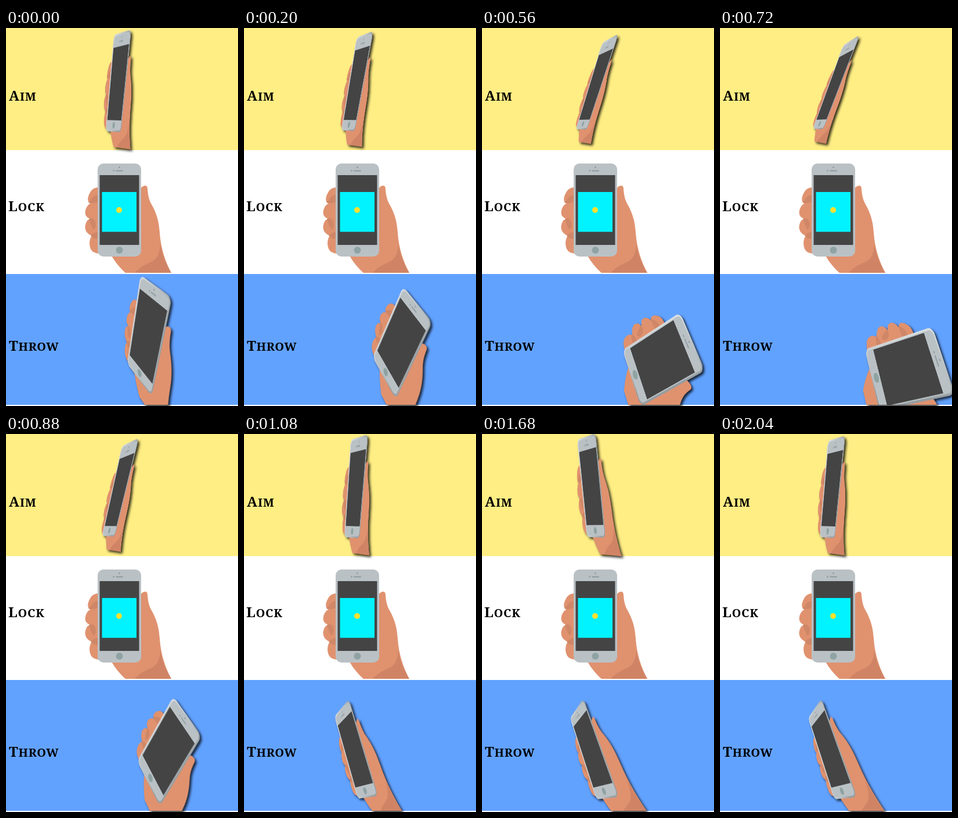
Animation, 400 px wide and 650 px high, one loop 2.48 s. Source, as an HTML page:

```html
<!DOCTYPE html>
<html lang="en">
<head>
<meta charset="utf-8">
<title>Aim, Lock, Throw</title>
<style>
  html, body { margin: 0; width: 100%; height: 100%; overflow: hidden; background: #fff; }
  .stage { position: absolute; left: 0; top: 0; width: 400px; height: 650px; overflow: hidden; }
  .band { position: absolute; left: 0; width: 100%; }
  .aim { top: 0; height: 210px; background: #ffee84; }
  .throw { top: 423px; height: 225px; background: #62a2ff; }
  .layer { position: absolute; inset: 0; }
  .shade { filter: drop-shadow(3px 3px 2px rgba(0, 0, 0, .8)); }
  .cut { clip-path: inset(-50px 0 2px 0); }
  svg { position: absolute; left: 0; top: 0; overflow: visible; }
  .device { width: 170px; height: 205px; transform-origin: 0 0; }
  text { font: 700 20px "Noto Serif", serif; letter-spacing: .8px; fill: #000; }
  .cap { font-size: 24px; }
</style>
</head>
<body>
<div class="stage">
  <div class="band aim"></div>
  <div class="band throw"></div>

  <svg width="400" height="650" viewBox="0 0 400 650">
    <defs>
      <linearGradient id="rim" x1="0" x2="1" y1="0" y2=".3">
        <stop offset="0" stop-color="#dce1e3"/>
        <stop offset=".6" stop-color="#bac1c5"/>
        <stop offset="1" stop-color="#959da1"/>
      </linearGradient>
      <g id="hand">
        <path fill="#e0926f" d="M228 284 C231 276 234 272 240 271 Q244 271 244 277 C245 290 247 297 253 307 C262 324 264 338 265 352 C267 380 275 402 285 421 L206 421 C197 413 189 404 181 390 L190 330 Z"/>
        <path fill="#d08465" d="M222 421 C230 411 242 406 251 402 C261 397 265 388 266 372 C269 391 276 406 285 421 Z"/>
        <g fill="#e0926f">
          <path d="M163 274 Q151 273 146 281 Q139 292 142 299 Q147 306 163 304 Z"/>
          <path d="M163 298 Q148 299 142 304 Q135 312 137 321 Q140 330 163 331 Z"/>
          <path d="M163 324 Q146 326 140 331 Q134 341 138 349 Q143 359 163 360 Z"/>
          <path d="M163 352 Q151 355 146 360 Q142 370 146 380 Q150 388 163 388 Z"/>
        </g>
        <g fill="#cf8767">
          <path d="M158 287 Q151 288 148 293 Q144 299 142 300 Q149 303 158 299 Z"/>
          <path d="M143 328 Q151 325 154 333 Q157 342 151 347 Q146 340 143 328 Z"/>
          <path d="M146 357 Q153 350 158 351 L158 362 Q151 364 146 357 Z"/>
        </g>
      </g>
      <g id="phone">
        <rect x="158" y="233" width="75" height="160" rx="10" fill="#bac1c5"/>
        <rect x="161.5" y="253" width="68" height="120" fill="#444"/>
        <g fill="#929ea2">
          <circle cx="195.5" cy="239.5" r="1.4"/>
          <circle cx="185.5" cy="245.5" r="1.4"/>
          <rect x="189" y="244.5" width="13" height="2.2" rx="1.1"/>
        </g>
        <circle cx="195.5" cy="382" r="6" fill="#8fa3a3"/>
      </g>
    </defs>

    <use href="#hand"/>
    <use href="#phone"/>
    <rect x="165.5" y="282" width="59.5" height="68.5" fill="#00f3ff"/>
    <circle cx="195" cy="313" r="5" fill="#ffe12f"/>

    <text x="5" y="125"><tspan class="cap">A</tspan>IM</text>
    <text x="4" y="315"><tspan class="cap">L</tspan>OCK</text>
    <text x="5" y="555"><tspan class="cap">T</tspan>HROW</text>
  </svg>

  <div class="layer shade">
    <div class="layer">
      <svg class="device" id="aimer" viewBox="130 225 170 205">
        <use href="#hand"/><use href="#phone"/>
        <rect x="159" y="234" width="73" height="158" rx="9" fill="none" stroke="url(#rim)" stroke-width="2.5"/>
      </svg>
    </div>
  </div>
  <div class="layer shade">
    <div class="layer cut">
      <svg class="device" id="thrower" viewBox="130 225 170 205">
        <use href="#hand"/><use href="#phone"/>
        <rect x="159" y="234" width="73" height="158" rx="9" fill="none" stroke="url(#rim)" stroke-width="2.5"/>
      </svg>
    </div>
  </div>
</div>

<script>
const LOOP = 2480, STEP = 40, REST = 2040;

// Phone corners: top left, top right, bottom right, bottom left
const upright = [186, 12, 216, 3, 198, 179, 172, 177];
const aimKeys = [
  [0, upright],
  [400, [202, 21, 230, 8, 184, 175, 164, 174]],
  [720, [212, 30, 241, 12, 178, 174, 160, 173]],
  [1080, [184, 10, 214, 1, 199, 179, 173, 177]],
  [1400, [152, 15, 186, 1, 220, 176, 186, 175]],
  [1680, [164, 10, 196, -1, 213, 178, 181, 177]],
  [REST, upright]
];

const raised = [232, 425, 286, 464, 251, 633, 209, 577];
const tilted = [317, 465, 363, 548, 272, 643, 235, 555];
const released = [152, 489, 175, 455, 236, 624, 197, 628];
const throwKeys = [
  [0, raised],
  [400, tilted],
  [720, [366, 514, 405, 630, 275, 658, 250, 553]],
  [840, tilted],
  [960, raised],
  [1080, [156, 486, 181, 456, 231, 622, 196, 627]],
  [1120, released],
  [REST, released]
];

function poseAt(keys, t) {
  let i = 1;
  while (i < keys.length - 1 && t > keys[i][0]) i++;
  const [t0, from] = keys[i - 1], [t1, to] = keys[i];
  const k = (t - t0) / (t1 - t0);
  return from.map((v, n) => v + (to[n] - v) * k);
}

// Perspective transform that lays the 75 x 160 phone on four corners
function warp([x0, y0, x1, y1, x2, y2, x3, y3]) {
  const ax = x1 - x2, ay = y1 - y2, bx = x3 - x2, by = y3 - y2;
  const sx = x0 - x1 + x2 - x3, sy = y0 - y1 + y2 - y3;
  const den = ax * by - bx * ay;
  const g = (sx * by - bx * sy) / den, h = (ax * sy - sx * ay) / den;
  const m = [
    x1 - x0 + g * x1, y1 - y0 + g * y1, 0, g,
    x3 - x0 + h * x3, y3 - y0 + h * y3, 0, h,
    0, 0, 1, 0,
    x0, y0, 0, 1
  ].map(v => v.toFixed(6));
  return `matrix3d(${m}) scale(${1 / 75}, ${1 / 160}) translate(-28px, -8px)`;
}

const aimer = document.getElementById("aimer");
const thrower = document.getElementById("thrower");
const start = performance.now();

function draw() {
  const elapsed = (performance.now() - start) % LOOP;
  const t = Math.min(REST, Math.floor(elapsed / STEP) * STEP);
  aimer.style.transform = warp(poseAt(aimKeys, t));
  thrower.style.transform = warp(poseAt(throwKeys, t));
  requestAnimationFrame(draw);
}
draw();
</script>
</body>
</html>
```
